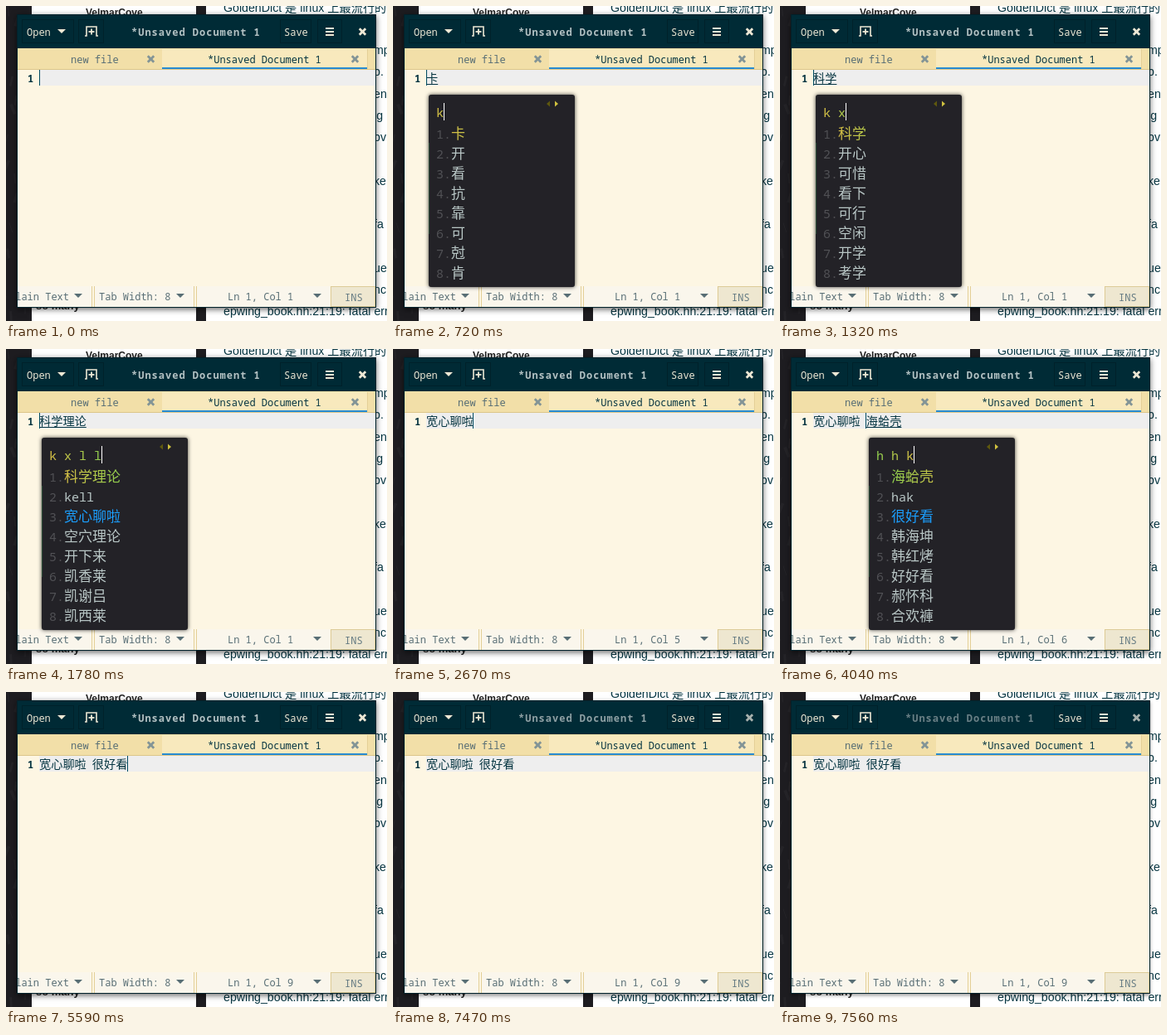
Write an HTML page with a canvas that moves like this. It is 459x380 px and loops after 8 s.

```html
<!DOCTYPE html>
<html lang="en">
<head>
<meta charset="utf-8">
<title>Typing with an input method</title>
<style>
  html, body { margin: 0; height: 100%; overflow: hidden; }
  canvas { display: block; }
</style>
</head>
<body>
<canvas id="stage" width="459" height="380"></canvas>
<script>
const ctx = document.getElementById('stage').getContext('2d');
const LOOP = 8000;
const LATIN = '"Noto Sans Mono", "DejaVu Sans Mono", monospace';
const HAN = '"Noto Sans Mono CJK SC", "Noto Sans CJK SC", sans-serif';
const PAGE = '14.2px "Liberation Sans", "Noto Sans CJK SC", sans-serif';
const UI = '12px ' + LATIN;
const EDITOR = '14.2px ' + HAN;
const POPUP = '15px ' + LATIN;
const POPUP_HAN = '17px ' + HAN;
const INK = '#073642';
const FIRST = '宽心聊啦';

// Each step: start time, committed text, typed keys, candidates ("~" marks a cloud result)
const steps = [
  [0, ''],
  [720, '', 'k', '卡 开 看 抗 靠 可 尅 肯'],
  [1280, '', 'k x', '科学 开心 ~… 看下 可行 空闲 开学 考学'],
  [1320, '', 'k x', '科学 开心 可惜 看下 可行 空闲 开学 考学'],
  [1570, '', 'k x l', '看下来 kel ~可惜了 开下来 空穴来 凯香莱 凯谢吕 凯西莱'],
  [1780, '', 'k x l l', `科学理论 kell ~${FIRST} 空穴理论 开下来 凯香莱 凯谢吕 凯西莱`],
  [2670, FIRST],
  [2880, FIRST + ' '],
  [3160, FIRST + ' ', 'h', '和 会 好 还 后 很 或 话'],
  [3520, FIRST + ' ', 'h h', '哈哈 hh ~… 呵呵 哈哈哈哈哈 很好 好好 后悔'],
  [3670, FIRST + ' ', 'h h', '哈哈 hh ~很好 呵呵 哈哈哈哈哈 绘画 好好 后悔'],
  [3890, FIRST + ' ', 'h h k', '海蛤壳 hak ~… 韩海坤 韩红烤 好好看 郝怀科 合欢褲'],
  [4040, FIRST + ' ', 'h h k', '海蛤壳 hak ~很好看 韩海坤 韩红烤 好好看 郝怀科 合欢褲'],
  [5590, FIRST + ' 很好看'],
];

function rect(x, y, w, h, color) {
  ctx.fillStyle = color;
  ctx.fillRect(x, y, w, h);
}

// Draws a string and returns its width
function text(str, x, y, color, font = UI, spacing = 0) {
  ctx.font = font;
  ctx.letterSpacing = spacing + 'px';
  ctx.fillStyle = color;
  ctx.fillText(str, x, y);
  return ctx.measureText(str).width;
}

function shape(points, color, width) {
  ctx.beginPath();
  points.forEach(([x, y], i) => i ? ctx.lineTo(x, y) : ctx.moveTo(x, y));
  if (width) {
    ctx.strokeStyle = color;
    ctx.lineWidth = width;
    ctx.stroke();
  } else {
    ctx.fillStyle = color;
    ctx.fill();
  }
}

const arrowDown = (x, y, color) => shape([[x, y], [x + 10, y], [x + 5, y + 5]], color);

function cross(x, y, color) {
  shape([[x - 3.7, y - 3.7], [x + 3.7, y + 3.7]], color, 2.8);
  shape([[x + 3.7, y - 3.7], [x - 3.7, y + 3.7]], color, 2.8);
}

function box(x, y, w, h, fill, border) {
  rect(x, y, w, h, border);
  rect(x + 1, y + 1, w - 2, h - 2, fill);
}

function drawDesktop() {
  rect(0, 0, 459, 380, '#1d1c20');
  let seed = 7;
  const random = () => (seed = seed * 16807 % 2147483647) / 2147483647;
  for (let i = 0; i < 45; i++) {
    const x = random() * 30, y = random() * 380;
    shape([[x, y], [x + random() * 10 - 5, y + 12]], 'rgba(255,255,255,.03)', 1 + random() * 3);
  }
  rect(31, 0, 198, 380, '#fff');
  rect(241, 0, 218, 380, '#fff');
  text('VelmarCove', 96, 12, '#222', 'bold 12px "Liberation Sans", sans-serif');
  text('so many', 36, 366, '#222', 'bold 13px "Liberation Sans", sans-serif');
  text('GoldenDict 是 linux 上最流行的一', 262, 7, INK, PAGE);
  ['mp', 'b.', 'en', 'ig', 'bv', '', 'ke', '', 'fa', '', 'ue', 'nc'].forEach((s, i) =>
    text(s, 443, 58 + i * 26.3, INK, PAGE));
  text('epwing_book.hh:21:19: fatal error', 262, 373, INK, PAGE);
}

function drawHeader(focus) {
  rect(14, 11, 431, 40, '#002b36');
  for (const [x, w] of [[19, 63], [87, 31], [330, 38], [375, 30]])
    box(x, 16, w, 29, '#002a35', '#00212a');
  const light = '#eee8d5';
  text('Open', 25, 36, light);
  arrowDown(62, 28, light);
  shape([[95, 36], [97, 36], [97, 25], [109, 25], [109, 36], [111, 36]], light, 1.6);
  shape([[99.5, 31], [106.5, 31]], light, 1.8);
  shape([[103, 27.5], [103, 34.5]], light, 1.8);
  const shade = (low, high) => low + (high - low) * focus;
  text('*Unsaved Document 1', 151, 36,
    `rgb(${shade(106, 180)},${shade(128, 194)},${shade(134, 196)})`, 'bold ' + UI, 1);
  text('Save', 335, 36, light);
  for (const y of [26, 30, 34]) rect(385, y, 10, 2, light);
  cross(429.5, 31, focus === 1 ? light : '#a9b2ae');
}

function drawTabs() {
  rect(14, 51, 431, 25, '#f2dfa8');
  rect(188, 52, 247, 24, '#f8e9bd');
  rect(14, 76, 431, 1, '#dcc68a');
  rect(435, 52, 1, 24, '#e4d097');
  rect(188, 74, 247, 2, '#268bd2');
  text('new file', 78, 69, '#586e75');
  text('*Unsaved Document 1', 243, 69, INK);
  cross(174.5, 64, '#839496');
  cross(420.5, 64, '#839496');
}

function drawStatus(column) {
  const gray = '#586e75';
  rect(14, 338, 90, 25, '#faf6ec');
  rect(107, 338, 119, 25, '#faf6ec');
  rect(230, 338, 160, 25, '#faf6ec');
  for (const x of [103, 106, 226, 229]) rect(x, 338, 1, 25, '#e3cf98');
  box(391, 338, 54, 25, '#eee7d0', '#dccb98');
  text('Plain Text', 4, 355, gray);
  arrowDown(82, 347, gray);
  text('Tab Width: 8', 112, 355, gray);
  arrowDown(205, 347, gray);
  text('Ln 1, Col ' + column, 267, 355, gray);
  arrowDown(370, 347, gray);
  text('INS', 408, 356, '#657b83');
}

function drawPopup(x, keys, candidates) {
  ctx.save();
  ctx.shadowColor = 'rgba(0,0,0,.75)';
  ctx.shadowBlur = 5;
  ctx.fillStyle = '#232227';
  ctx.beginPath();
  ctx.roundRect(x, 107, 176, 232, 3);
  ctx.fill();
  ctx.restore();
  rect(x, 165, 1, 110, 'rgba(50,120,70,.5)');

  const ends = ['#d8bf45', '#8fd04e'];
  if (keys[0] === 'h') ends.reverse();
  const gradient = (from, to) => {
    const g = ctx.createLinearGradient(from, 0, to, 0);
    ends.forEach((color, i) => g.addColorStop(i, color));
    return g;
  };
  const left = x + 9, caret = left + keys.length * 9;
  text(keys, left, 134, gradient(left, Math.max(caret, left + 40)), POPUP);
  rect(caret, 117, 1, 21, '#fff');
  shape([[x + 146, 114.5], [x + 146, 121.5], [x + 142, 118]], '#5f590e');
  shape([[x + 152, 114.5], [x + 152, 121.5], [x + 156, 118]], '#d0c13f');

  candidates.forEach((word, i) => {
    const y = 160 + i * 24, cloud = word[0] === '~';
    const color = cloud ? '#1b9dfb' : i ? '#b9c7c6' : gradient(left + 18, left + 86);
    text(i + 1 + '.', left, y, '#515155', POPUP);
    text(word.replace('~', ''), left + 18, y, color, /^[a-z]/.test(word) ? POPUP : POPUP_HAN);
  });
}

function draw(t) {
  const [, committed, keys, list] = steps.findLast(step => step[0] <= t);
  const focus = t < 7470 ? 1 : t < 7560 ? 0.5 : 0;
  const candidates = list ? list.split(' ') : [];

  drawDesktop();
  ctx.save();
  ctx.shadowColor = `rgba(0,0,0,${0.4 + 0.2 * focus})`;
  ctx.shadowBlur = 4 + 3 * focus;
  ctx.shadowOffsetY = 2;
  rect(13, 10, 433, 354, '#00212a');
  ctx.restore();

  ctx.save();
  ctx.beginPath();
  ctx.rect(14, 11, 431, 352);
  ctx.clip();
  rect(14, 11, 431, 352, '#fdf6e3');
  drawHeader(focus);
  drawTabs();
  rect(40, 77, 405, 19, '#eeeeee');
  text('1', 26, 92, INK, 'bold ' + UI);
  const caret = 40 + text(committed, 40, 92, INK, EDITOR);
  if (keys) {
    const width = text(candidates[0], caret, 92, INK, EDITOR);
    rect(caret, 94, width, 1, INK);
  }
  if (focus === 1) rect(Math.floor(caret), 77, 1, 19, '#004a60');
  drawStatus(committed.length + 1);
  ctx.restore();

  if (keys) drawPopup(committed ? 107 : 43, keys, candidates);
}

function tick() {
  draw(performance.now() % LOOP);
  requestAnimationFrame(tick);
}
tick();
</script>
</body>
</html>
```
